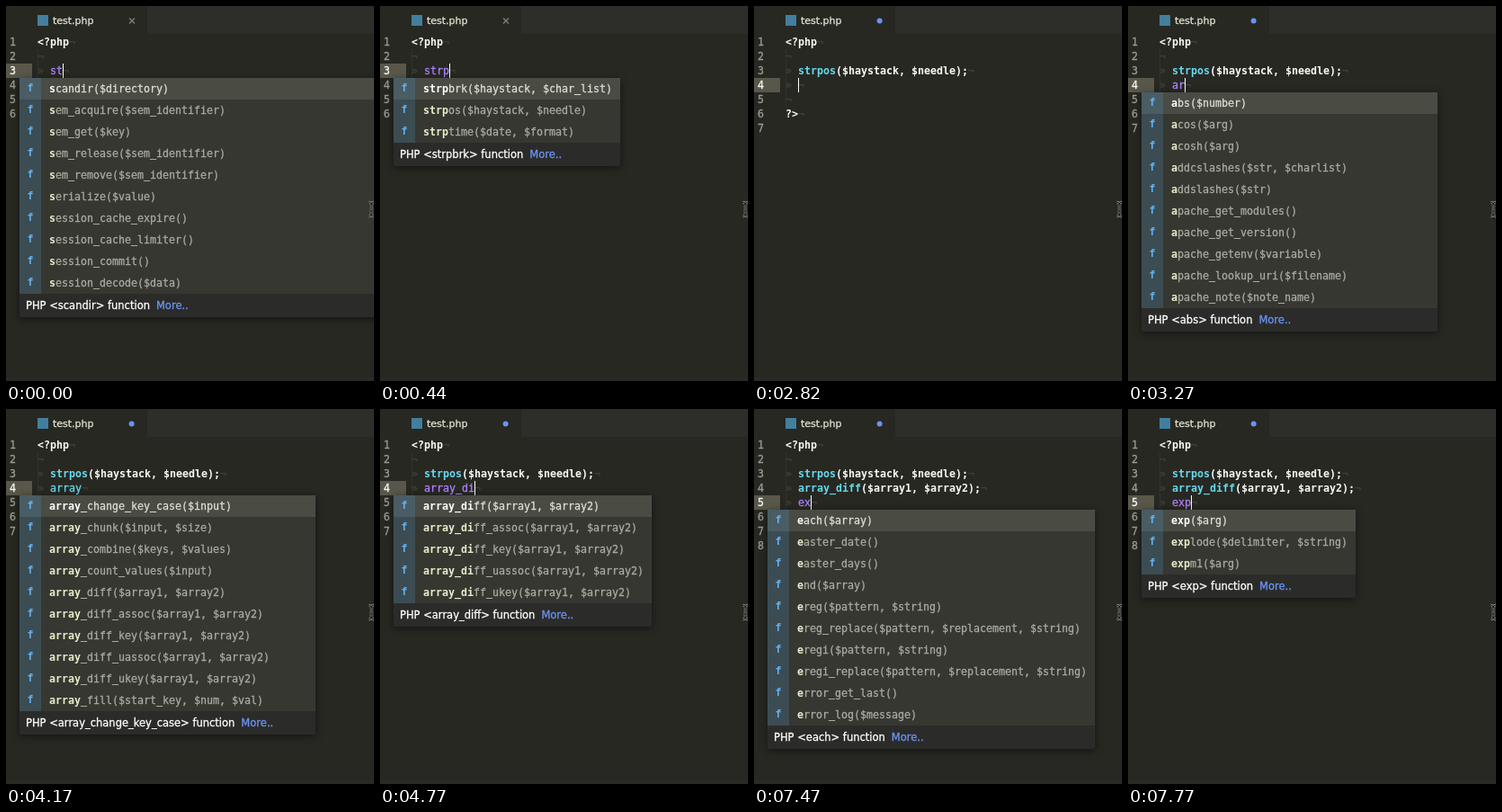
These frames come from a looping animation (409 by 417 pixels, 8000 ms). An HTML page with a canvas:

```html
<!DOCTYPE html>
<html lang="en">
<head>
<meta charset="utf-8">
<title>Autocomplete</title>
<style>
html, body { margin: 0; width: 100%; height: 100%; overflow: hidden; background: #272822; }
canvas { display: block; }
</style>
</head>
<body>
<canvas id="stage" width="409" height="417"></canvas>
<script>
const ctx = document.getElementById('stage').getContext('2d');
const LOOP = 8000, CHAR = 7, LINE = 16, ITEM = 24, TEXT_X = 35;
const MONO = '11.63px "DejaVu Sans Mono", monospace';
const BOLD = 'bold ' + MONO;
const SANS = '11.5px "DejaVu Sans", sans-serif';
const TITLE = '11px "DejaVu Sans", sans-serif';
const CYAN = '#66d9ef', PURPLE = '#ae81ff', WHITE = '#f8f8f2', FAINT = '#40413a', BLUE = '#6b92f5';

const calls = ['strpos($haystack, $needle)', 'array_diff($array1, $array2)'];

const functions = `abs($number)
acos($arg)
acosh($arg)
addcslashes($str, $charlist)
addslashes($str)
apache_get_modules()
apache_get_version()
apache_getenv($variable)
apache_lookup_uri($filename)
apache_note($note_name)
array_change_key_case($input)
array_chunk($input, $size)
array_combine($keys, $values)
array_count_values($input)
array_diff($array1, $array2)
array_diff_assoc($array1, $array2)
array_diff_key($array1, $array2)
array_diff_uassoc($array1, $array2)
array_diff_ukey($array1, $array2)
array_fill($start_key, $num, $val)
array_uintersect_uassoc($array1, $array2)
each($array)
easter_date()
easter_days()
end($array)
ereg($pattern, $string)
ereg_replace($pattern, $replacement, $string)
eregi($pattern, $string)
eregi_replace($pattern, $replacement, $string)
error_get_last()
error_log($message)
exec($command)
exif_imagetype($filename)
exif_read_data($filename)
exif_tagname($index)
exif_thumbnail($filename)
exp($arg)
explode($delimiter, $string)
expm1($arg)
extension_loaded($name)
extract($var_array)
scandir($directory)
sem_acquire($sem_identifier)
sem_get($key)
sem_release($sem_identifier)
sem_remove($sem_identifier)
serialize($value)
session_cache_expire()
session_cache_limiter()
session_commit()
session_decode($data)
stat($filename)
str_getcsv($input)
str_ireplace($search, $replace, $subject)
str_pad($input, $pad_length)
str_repeat($input, $multiplier)
str_replace($search, $replace, $subject)
str_rot13($str)
str_shuffle($str)
str_split($str)
str_word_count($str)
strcasecmp($str1, $str2)
stream_context_set_option($stream_or_context, $wrapper, $option, $value)
strpbrk($haystack, $char_list)
strpos($haystack, $needle)
strptime($date, $format)`.split('\n');

// [start time, row being edited, its text, popup prefix, caret visible, brackets marked]
const states = [
  [0, 0, 'st', 's', 1],
  [150, 0, 'st', 'st', 1],
  [290, 0, 'str', 'str', 1],
  [440, 0, 'strp', 'strp', 1],
  [580, 0, 'strpo', 'strpo', 1],
  [730, 0, 'strpos', 'strpos', 1],
  [1180, 0, 'strpos', 'strpos', 0],
  [1480, 0, calls[0], '', 1, 1],
  [1920, 0, calls[0], '', 0, 1],
  [2370, 0, calls[0], '', 1, 1],
  [2520, 0, calls[0] + ';', '', 1],
  [2820, 1, '', '', 1],
  [2970, 1, 'a', '', 1],
  [3120, 1, 'a', 'a', 1],
  [3270, 1, 'ar', 'a', 1],
  [3420, 1, 'arr', 'arr', 1],
  [3570, 1, 'arra', 'arra', 1],
  [3720, 1, 'array', 'array', 1],
  [4170, 1, 'array', 'array', 0],
  [4470, 1, 'array_', 'array_', 1],
  [4770, 1, 'array_di', 'array_di', 1],
  [4920, 1, 'array_dif', 'array_dif', 1],
  [5070, 1, 'array_diff', 'array_diff', 1],
  [5520, 1, 'array_diff', 'array_diff', 0],
  [5820, 1, calls[1], '', 1, 1],
  [6270, 1, calls[1], '', 0, 1],
  [6420, 1, calls[1] + ';', '', 1, 1],
  [6570, 1, calls[1] + ';', '', 1],
  [6720, 2, '', '', 1],
  [7320, 2, 'e', '', 1],
  [7470, 2, 'ex', 'e', 1],
  [7620, 2, 'ex', 'ex', 1],
  [7770, 2, 'exp', 'exp', 1]
];

function rect(x, y, w, h, color) {
  ctx.fillStyle = color;
  ctx.fillRect(x, y, w, h);
}

// A hairline outline gives regular weights a slightly heavier rendering.
function text(string, x, y, color, font = MONO) {
  ctx.font = font;
  ctx.fillStyle = ctx.strokeStyle = color;
  ctx.fillText(string, x, y);
  if (font !== BOLD) {
    ctx.lineWidth = 0.3;
    ctx.strokeText(string, x, y);
  }
}

function drawTab(modified) {
  rect(157, 0, 252, 31, '#2d2e29');
  rect(35, 10, 12, 12, '#427f9e');
  text('test.php', 52, 20, '#dfe3cf', TITLE);
  ctx.beginPath();
  if (modified) {
    ctx.arc(139.6, 16.5, 3, 0, 7);
    ctx.fillStyle = BLUE;
    ctx.fill();
  } else {
    ctx.moveTo(137, 13.5);
    ctx.lineTo(143, 19.5);
    ctx.moveTo(143, 13.5);
    ctx.lineTo(137, 19.5);
    ctx.strokeStyle = '#7b7c74';
    ctx.lineWidth = 1.5;
    ctx.stroke();
  }
}

function drawCall(code, x, y) {
  const open = code.indexOf('(');
  if (open < 0) {
    text(code, x, y, code === 'array' ? CYAN : PURPLE);
    return;
  }
  text(code.slice(0, open), x, y, CYAN, BOLD);
  text(code.slice(open), x + open * CHAR, y, WHITE, BOLD);
}

function drawCode(row, typed, caret, marked) {
  const rows = [...calls.slice(0, row).map(call => call + ';'), typed];
  const lines = ['<?php', '', ...rows, '', '?>', ''];
  const current = row + 2, top = 32 + current * LINE, x = TEXT_X + 2 * CHAR;

  rect(0, top, 29, LINE, '#58574a');
  rect(TEXT_X, 48, 1, (rows.length + 2) * LINE, '#31322b');
  lines.forEach((line, i) => {
    const y = 44 + i * LINE;
    const isCall = i > 1 && i <= current;
    const start = isCall ? x : TEXT_X;
    text(i + 1, 4, y, i === current ? WHITE : '#9a9b94');
    if (isCall) {
      text('»', TEXT_X, y, FAINT);
      drawCall(line, start, y);
    } else {
      text(line, start, y, WHITE, BOLD);
    }
    if (i < lines.length - 1) text('¬', start + line.length * CHAR, y, FAINT);
  });

  if (marked) {
    const open = x + typed.indexOf('(') * CHAR;
    for (let i = 0; i < CHAR; i += 2) rect(open + i, top + LINE, 1, 1, '#b5b5ac');
    rect(x + typed.indexOf(')') * CHAR, top + LINE, CHAR, 1, '#0f0');
  }
  if (caret) rect(x + typed.length * CHAR, top, 1, LINE, '#fff');
}

function drawPopup(prefix, top) {
  const matches = functions.filter(name => name.startsWith(prefix));
  const items = matches.slice(0, 10);
  const width = 42 + CHAR * Math.max(...matches.map(name => name.length));
  const listHeight = items.length * ITEM, footer = top + listHeight;

  ctx.save();
  ctx.shadowColor = 'rgba(0, 0, 0, 0.5)';
  ctx.shadowBlur = 9;
  ctx.shadowOffsetY = 2;
  ctx.beginPath();
  ctx.roundRect(15, top, width, listHeight + 26, 2);
  ctx.fillStyle = '#2b2c29';
  ctx.fill();
  ctx.restore();

  rect(15, top, width, listHeight, '#363731');
  rect(15, top, 24, listHeight, '#3c4c53');
  rect(15, top, width, ITEM, '#4a4b43');
  rect(15, top, 24, ITEM, '#4a5c64');
  items.forEach((name, i) => {
    const y = top + i * ITEM + 16;
    text('f', 23.5, y - 1, '#62b1ee', BOLD);
    text(prefix, 48, y, i ? '#e9ebc9' : '#fff', BOLD);
    text(name.slice(prefix.length), 48 + prefix.length * CHAR, y, i ? '#a9aaa1' : '#dcddd5');
  });

  const label = `PHP <${items[0].split('(')[0]}> function`;
  text(label, 22, footer + 17, '#fff', SANS);
  text('More..', 22 + ctx.measureText(label).width + 7, footer + 17, BLUE, SANS);
}

function drawPointer() {
  ctx.beginPath();
  ctx.moveTo(403, 218);
  ctx.quadraticCurveTo(406, 218, 406, 221);
  ctx.quadraticCurveTo(406, 218, 409, 218);
  ctx.moveTo(406, 220);
  ctx.lineTo(406, 232);
  ctx.moveTo(403, 234);
  ctx.quadraticCurveTo(406, 234, 406, 231);
  ctx.quadraticCurveTo(406, 234, 409, 234);
  ctx.moveTo(404, 228);
  ctx.lineTo(408, 228);
  for (const [width, color] of [[2.6, '#85857f'], [1, '#181914']]) {
    ctx.lineWidth = width;
    ctx.strokeStyle = color;
    ctx.stroke();
  }
}

function draw(now) {
  const time = now % LOOP;
  const [, row, typed, prefix, caret, marked] = states.findLast(state => state[0] <= time);
  rect(0, 0, 409, 417, '#272822');
  rect(0, 411, 409, 1, '#23241f');
  rect(0, 412, 409, 5, '#292a25');
  drawTab(time >= 1030);
  drawCode(row, typed, caret, marked);
  if (prefix) drawPopup(prefix, 80 + row * LINE);
  drawPointer();
}

const startTime = performance.now();
function tick() {
  draw(performance.now() - startTime);
  requestAnimationFrame(tick);
}
tick();
</script>
</body>
</html>
```
